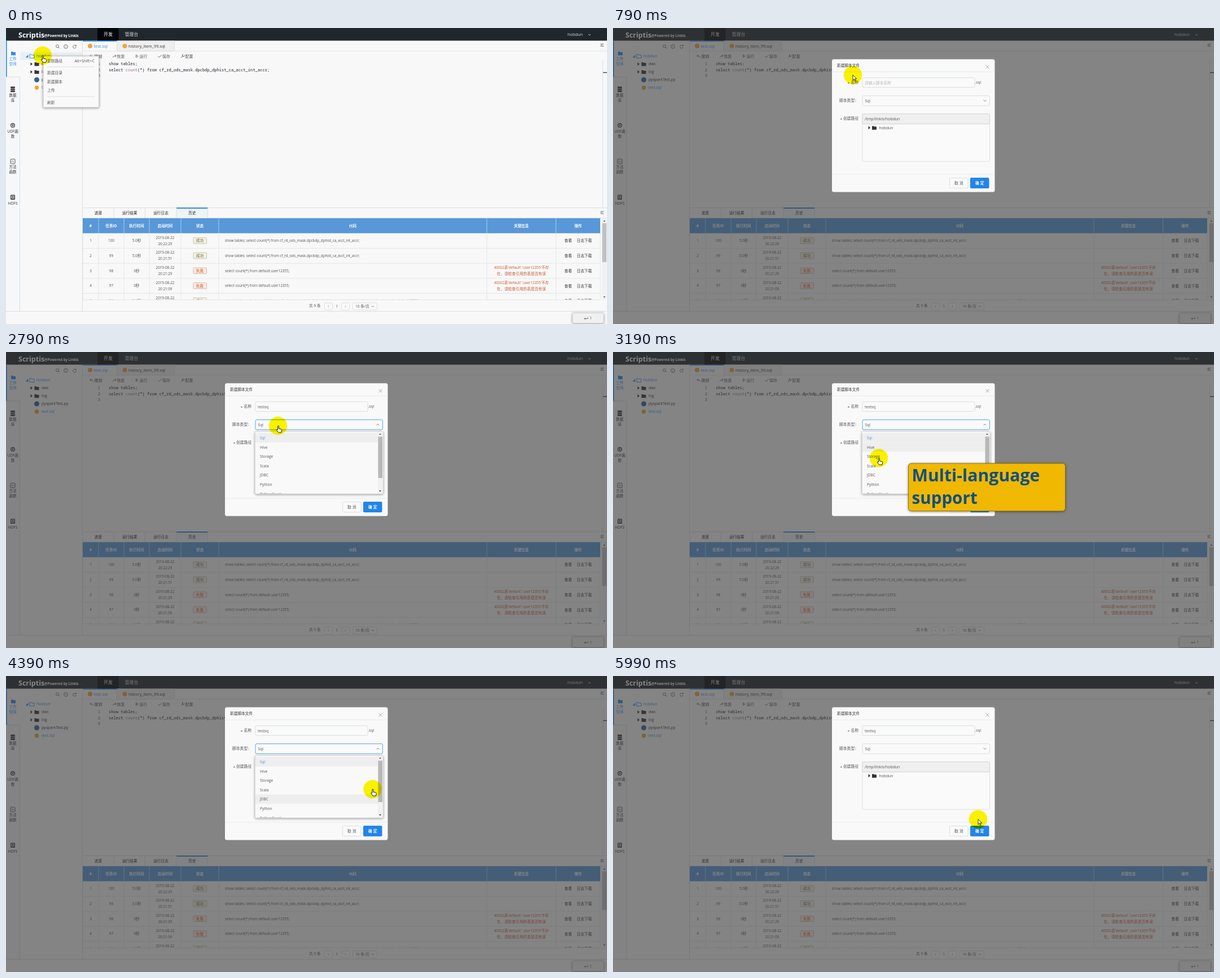
Write an HTML page that moves like this. It is 1065 px wide and 526 px high and loops after 6050 ms.

```html
<!DOCTYPE html>
<html lang="zh-CN">
<head>
<meta charset="utf-8">
<title>Script editor</title>
<style>
html, body { margin: 0; width: 100%; height: 100%; overflow: hidden; background: #f8f8f8; }
svg { display: block; width: 1065px; height: 526px; }
text { font-family: "Open Sans", "Noto Sans CJK SC", "Noto Sans CJK", sans-serif; white-space: pre; }
.mono { font-family: "Noto Sans Mono", "DejaVu Sans Mono", monospace; }
.bold { font-weight: 700; }
.line { fill: none; stroke: #666; stroke-width: .9; }
.shadow { filter: drop-shadow(0 1px 2px #0006); }
#halo { fill: #fff700; mix-blend-mode: multiply; }
</style>
</head>
<body>
<svg id="stage" viewBox="0 0 1065 526"></svg>
<script>
const USER = 'hobdun', BLUE = '#2d8cf0', GREY = '#555', DARK = '#333', EDGE = '#dcdee2';
const stage = document.getElementById('stage');

// y is the vertical middle of the text
const text = (x, y, s, size = 6.7, fill = GREY, anchor = 'start', cls = '') =>
  `<text x="${x}" y="${y + size * .36}" font-size="${size}" fill="${fill}" text-anchor="${anchor}" class="${cls}">${s}</text>`;
const mid = (x, y, s, size, fill, cls) => text(x, y, s, size, fill, 'middle', cls);
const box = (x, y, w, h, fill, stroke = 'none', r = 0, more = '') =>
  `<rect x="${x}" y="${y}" width="${w}" height="${h}" fill="${fill}" stroke="${stroke}" rx="${r}" ${more}/>`;
const hline = (x, y, w, c = EDGE) => box(x, y, w, 1, c);
const vline = (x, y, h, c = EDGE) => box(x, y, 1, h, c);
const shape = (x, y, d, fill) => `<path transform="translate(${x} ${y})" d="${d}" fill="${fill}"/>`;
const stroke = (x, y, d, c = '#666') =>
  `<path transform="translate(${x} ${y})" d="${d}" class="line" style="stroke:${c}"/>`;
const dot = (x, y, r, fill) => `<circle cx="${x}" cy="${y}" r="${r}" fill="${fill}"/>`;
const group = (id, body, more = '') => `<g id="${id}" ${more}>${body}</g>`;

const FOLDER = 'M-4-3h3l1 1h4v5.5h-8z', RIGHT = 'M-1.5-3l3.5 3-3.5 3z', CORNER = 'M2.5-2.5v5h-5z';
const DOWN = 'M-2.5-1.2L0 1.2 2.5-1.2', UP = 'M-2.5 1.2L0-1.2 2.5 1.2';
const TRI_UP = 'M-2 1L0-1.2 2 1z', TRI_DOWN = 'M-2-1L0 1.2 2-1z';
const MENU = 'M-3-2h6M-3 0h4M-3 2h6';

function header() {
  return box(0, 0, 1065, 22.5, '#20272d') + box(162, 0, 37.5, 22.5, '#04070a') +
    text(22, 12.3, 'Scriptis', 12.5, '#fff', 'start', 'bold') +
    text(68, 14.2, '@Powered by Linkis', 6.15, '#fff', 'start', 'bold') +
    mid(181, 11.3, '开发', 8, '#fff') + mid(222.5, 11.3, '管理台', 7.8, '#ddd') +
    text(995, 11.3, USER, 7.4, '#ddd') + stroke(1034, 12, 'M-2-1L0 1 2-1', '#ddd');
}

function sidebar() {
  const labels = [[55, '工作', BLUE], [64, '空间', BLUE], [119.5, '数据'], [128.5, '库'], [183.5, 'UDF函'],
    [192.5, '数'], [247, '方法'], [256, '函数'], [311.5, 'HDFS']];
  return box(0, 87, 24, 416, '#f6f7f8') + box(0, 22.5, 1.6, 64.5, BLUE) + hline(0, 86.5, 24) + vline(24, 87, 416) +
    labels.map(([y, s, c]) => mid(12, y, s, 6.6, c || DARK)).join('') +
    shape(13, 45, FOLDER, BLUE) +
    [105.5, 109, 112.5].map(y => box(8, y - 1.5, 8, 3, '#444', 'none', 1.3)).join('') +
    dot(12, 173, 4, '#444') + dot(12, 173, 2.6, '#f6f7f8') + dot(12, 173, 1.4, '#444') +
    box(8, 233, 8, 8, 'none', '#555', 1) + mid(12, 237, 'fx', 5) +
    box(8, 296.5, 8, 8.5, '#444', 'none', 1) + box(9.5, 298, 5, 5, '#ddd') + dot(12, 300.5, 1.4, '#444');
}

function tree() {
  return vline(135, 22.5, 481) +
    `<circle cx="91" cy="32.3" r="2.5" class="line"/>` + stroke(91, 32.3, 'M1.8 1.8L4 4') +
    `<circle cx="106" cy="33" r="3.4" class="line"/>` + mid(106, 33, 'i', 5) +
    stroke(121.5, 33, 'M2.3-1.5A2.8 2.8 0 1 0 2.8.8M2.8-3v2H.8') +
    group('rowHover', box(25, 43, 110, 14, '#eaf0f1')) +
    shape(37, 50, CORNER, BLUE) + stroke(46, 50, FOLDER, BLUE) + text(54, 50, USER, 6.7, BLUE) +
    [[64, 'dwc'], [78, 'log']].map(([y, s]) =>
      shape(45, y, RIGHT, DARK) + shape(54.5, y, FOLDER, DARK) + text(63, y, s, 6.9, DARK)).join('') +
    dot(54.5, 92, 4.5, '#35618c') + text(63, 92, 'pysparkTest.py', 6.85, DARK) +
    dot(54.5, 106, 3.7, '#eca63c') + text(63, 106, 'test.sql', 6.85, BLUE);
}

function editor() {
  const tools = [[152, '撤销', 'M3 2.5Q2-1-3-.5M-1-2.8L-3.2-.5-1 1.6'], [192, '恢复', 'M-3 2.5Q-2-1 3-.5M1-2.8L3.2-.5 1 1.6'],
    [232, '运行', 'M-1.5-2.5L2 0-1.5 2.5z'], [272.5, '保存', 'M-3 0L-1 2.3 3.3-2.3'], [313, '配置', 'M-3 3L1-1M3.3-1.6A2 2 0 1 1 1.2-3.2']];
  const code = (y, n, s) => text(167, y, n, 7.1, '#3d5a6b', 'end', 'mono') + text(182, y, s, 7.1, '#1d1d2b', 'start', 'mono');
  return box(196.5, 23, 102, 18, '#efefef', EDGE) + hline(136, 40.5, 929, '#e4e5e7') + box(136, 22.5, 60, 1.5, BLUE) +
    dot(149, 32, 4, '#eca63c') + text(155.5, 32, 'test.sql', 7.35, BLUE) +
    dot(210.5, 32, 4, '#eca63c') + text(217, 32, 'history_item_99.sql', 7.25, DARK) +
    stroke(1056.5, 30.5, MENU) +
    tools.map(([x, s, d]) => stroke(x, 50, d) + text(x + 4.5, 50, s, 7)).join('') +
    code(63.8, 1, 'show tables;') +
    code(74.3, 2, 'select <tspan fill="#a070a0">count</tspan>(*) from cf_rd_ods_mask.dpcbdp_dphist_ca_acct_int_accr;') +
    code(84.8, 3, '') +
    vline(1057, 57, 262) + box(1058, 78.5, 7, 1.4, '#444');
}

function results() {
  const edges = [136, 164, 209, 254, 310, 377, 852, 974.5, 1053];
  const mids = edges.slice(1).map((x, i) => (x + edges[i]) / 2);
  const heads = ['#', '任务ID', '执行时间', '启动时间', '状态', '代码', '关键信息', '操作'];
  const good = 'show tables; select count(*) from cf_rd_ods_mask.dpcbdp_dphist_ca_acct_int_accr;';
  const bad = 'select count(*) from default.user12355;';
  const long = good.slice(0, -1) + ' where acct_int_mask_ods limit 5000;';
  const rows = [['5.0秒', '20:22:29', good], ['5.0秒', '20:21:51', good], ['0秒', '20:21:29', bad], ['0秒', '20:21:09', bad], ['5.0秒', '20:20:46', long]];
  const row = ([cost, time, code], i) => {
    const y = 378 + i * 26.7, fail = code === bad;
    const tag = fail ? ['#f9ece3', '#dcb8a6', '#d0502a', '失败'] : ['#f3f2e2', '#c8c6a6', '#66664a', '成功'];
    return hline(136, y + 13, 917, '#e3e6ea') + mid(mids[0], y, i + 1, 6.3) + mid(mids[1], y, 100 - i, 6.5) +
      mid(mids[2], y, cost, 6.5) + mid(mids[3], y - 5.5, '2019-08-22', 6.3) + mid(mids[3], y + 5.3, time, 6.3) +
      box(332, y - 5.3, 23.5, 10.5, tag[0], tag[1], 1) + mid(mids[4], y, tag[3], 6.7, tag[2]) +
      text(388, y, code, 6.25) +
      (fail ? mid(mids[6], y - 5.5, "40002表'default'.'user12355'不存", 6.4, '#c8562c') +
        mid(mids[6], y + 5.3, '在，请检查引用的表是否有误', 6.7, '#c8562c') : '') +
      text(989.5, y, '查看', 6.7, DARK) + text(1011.5, y, '日志下载', 6.7, DARK);
  };
  const tabs = ['进度', '运行结果', '运行日志', '历史'];
  return hline(136, 319, 929) + hline(136, 337.5, 929) + box(302, 319, 55.5, 19, '#f1f4f7') + box(302, 319, 55.5, 2, BLUE) +
    tabs.map((s, i) => mid(163.5 + i * 55.5, 328.5, s, 6.7, '#222') + vline(190.5 + i * 55.5, 320, 18)).join('') +
    stroke(1056.5, 328, MENU) +
    `<clipPath id="body"><rect x="136" y="338" width="918" height="145"/></clipPath>` +
    group('table', rows.map(row).join('') + edges.map(x => vline(x - .5, 365, 118, '#e3e6ea')).join(''), 'clip-path="url(#body)"') +
    box(136, 338, 917, 26.7, '#5898d8') + edges.slice(1, -1).map(x => vline(x - .5, 338, 26.7, '#a9c9e9')).join('') +
    heads.map((s, i) => mid(mids[i], 351.5, s, 6.6, '#fff', 'bold')).join('') +
    hline(136, 482.5, 917, '#e3e6ea') +
    box(1056, 338, 8.5, 145, '#f1f1f1') + box(1056.5, 347, 7.5, 69, '#c1c1c1') +
    shape(1060.3, 343, TRI_UP, GREY) + shape(1060.3, 478, TRI_DOWN, GREY) +
    text(537, 494, '共 9 条', 6.7) + box(564.5, 488.5, 14, 12.5, '#fafafa', EDGE, 2) + box(594.5, 488.5, 14, 12.5, '#fafafa', EDGE, 2) +
    stroke(571.5, 494.7, 'M1-2L-1 0 1 2', '#aaa') + stroke(601.5, 494.7, 'M-1-2L1 0-1 2', '#aaa') + mid(586.5, 494.7, '1', 6.7) +
    box(614.5, 488.5, 43, 12.5, '#fafafa', EDGE, 2) + text(619, 494.7, '10 条/页', 6.6) + stroke(650, 494.7, 'M-2-1L0 1 2-1') +
    hline(0, 503, 1065) + box(1004, 506.5, 55, 18, '#f0f0f0', '#d4d4d4', 2, 'class="shadow"') +
    stroke(1028, 516, 'M3-2v2.5h-6M-1.2-1.3L-3 .5-1.2 2.3') + text(1034.5, 516, '1', 6.7);
}

function contextMenu() {
  const item = (y, s, id = '') => group(id || 'item' + y, text(73, y, s, 6.75, GREY));
  return box(66, 50, 98.5, 91, '#f9f9f9', '#ccc', 1.5, 'class="shadow"') +
    group('uploadHover', box(66.5, 103.5, 97.5, 15, '#eaf0f0')) +
    item(59, '复制路径') + text(121.5, 59, 'Alt+Shift+C', 6.9) + hline(73, 68.5, 84) +
    item(80, '新建目录') + item(95.5, '新建脚本') + item(111, '上传', 'upload') +
    hline(73, 121.5, 84) + item(132.5, '刷新');
}

function dialog() {
  return box(0, 0, 1065, 526, '#373737', 'none', 0, 'opacity=".6"') +
    box(388, 55.5, 288.5, 236, '#f9f9f9', 'none', 3.5) +
    text(397, 67, '新建脚本文件', 6.7, DARK) + stroke(663.5, 69, 'M-3-3L3 3M3-3L-3 3', '#999') + hline(388, 77.5, 288.5, '#e8eaec') +
    text(415.5, 98, '*', 7, '#8a5a40') + text(421.5, 96.8, '名称', 6.8) +
    box(442, 88.5, 199, 17, '#fafafa', EDGE, 2, 'id="field"') +
    text(446, 97.3, '请输入脚本名称', 6.7, '#b8b8b8').replace('<text', '<text id="hint"') +
    text(446, 97.3, '', 6.8, GREY).replace('<text', '<text id="typed"') +
    text(641.5, 96.8, '.sql', 6.6) +
    text(401, 128.7, '脚本类型：', 6.8) + box(442, 120.5, 225.5, 17.5, '#fafafa', EDGE, 2, 'id="select"') + text(446.5, 129.3, 'Sql', 6.7) +
    group('closedMark', stroke(659, 129.2, DOWN, '#777')) + group('openMark', stroke(659, 129.2, UP, '#777')) +
    text(402.5, 162, '*', 7, '#8a5a40') + text(408, 161, '创建路径', 6.8) +
    box(442, 152.5, 225.5, 84.5, '#fafafa', EDGE, 2) + box(442, 152.5, 225.5, 18, '#efefef', '#d4d4d4', 1) +
    text(446, 161.8, '/tmp/linkis/' + USER, 6.9) +
    shape(454, 177.3, RIGHT, DARK) + shape(463, 177.3, FOLDER, DARK) + text(471.5, 177.3, USER, 6.8) +
    hline(388, 259.5, 288.5, '#e8eaec') +
    box(596.5, 266.5, 32.5, 18, '#fafafa', EDGE, 2) + mid(612.8, 275.7, '取 消', 6.8, GREY) +
    box(633, 266, 33.5, 19, '#2385e8', 'none', 2) + mid(649.8, 275.7, '确 定', 6.8, '#fff', 'bold');
}

function dropdown() {
  const langs = ['Sql', 'Hive', 'Storage', 'Scala', 'JDBC', 'Python', 'PythonSpark'];
  return box(441.5, 141.5, 226.5, 110.5, '#f9f9f9', '#ddd', 2, 'class="shadow"') +
    `<clipPath id="list"><rect x="441" y="142" width="218" height="109.5"/></clipPath>` +
    group('langs', box(442, 144, 217, 16.6, '#eee') + box(442, 144, 217, 16.6, '#eee', 'none', 0, 'id="langHover"') +
      langs.map((s, i) => text(450, 152.6 + i * 16.6, s, 6.5, i ? GREY : '#4a90d9')).join(''), 'clip-path="url(#list)"') +
    box(659, 142, 8.5, 109.5, '#f1f1f1') + box(659.5, 150.5, 7.5, 73.5, '#b8b8b8') +
    shape(663, 146, TRI_UP, GREY) + shape(663, 247, TRI_DOWN, DARK);
}

function callout() {
  return box(523.5, 198, 278, 84.5, '#f0b800', '#8a6d10', 5, 'class="shadow"') +
    text(529.5, 219.4, 'Multi-language', 30.2, '#0f5083', 'start', 'bold') +
    text(529.5, 259, 'support', 29.6, '#0f5083', 'start', 'bold');
}

const cursors = {
  hand: '<path d="M-.6 1.3c0-1.7 2.1-1.7 2.1 0v3.9l4 .9c1 .3 1.4 1 1.2 2l-.9 4H.8L-2.5 7.8c-.6-1 .7-1.8 1.9-.5z" fill="#fff" stroke="#000" stroke-width=".9"/>',
  arrow: '<path d="M0 0v9.4l2.2-2 1.5 3.4 1.5-.7-1.5-3.3h3z" fill="#fff" stroke="#000" stroke-width=".8"/>',
  beam: '<path d="M-2-4.5h1.4L0-4l.6-.5H2M0-4v8M-2 4.5h1.4L0 4l.6.5H2" fill="none" stroke="#222"/>'
};

stage.innerHTML = box(0, 0, 1065, 526, '#f8f8f8') + header() + sidebar() + tree() + editor() + results() +
  group('menu', contextMenu()) + group('dialog', dialog()) + group('dropdown', dropdown()) + group('callout', callout()) +
  '<circle id="halo" r="16.2"/>' +
  group('pointer', Object.entries(cursors).map(([k, d]) => group(k, d)).join(''));

const poses = [
  [65, 49, 'hand'], [106, 91.5, 'hand'], [425, 83.5, 'arrow'], [454, 96.5, 'beam'],
  [454, 96.5, 'beam'], [454, 96.5, 'beam'], [480, 124, 'hand'], [482, 131, 'hand'],
  [471, 188.5, 'hand'], [472, 189, 'hand'], [560, 197, 'hand'], [649.5, 201, 'hand'],
  [655, 203, 'hand'], [652, 222, 'arrow'], [648, 246, 'arrow'], [647, 254.5, 'arrow']
];
const hovered = { 8: 1, 9: 2, 10: 3, 11: 4, 12: 3 };
const el = id => document.getElementById(id);
const show = (id, on) => el(id).setAttribute('visibility', on ? 'inherit' : 'hidden');

function draw(ms) {
  const step = Math.floor((ms % 6050 + 10) / 400);
  const [x, y, kind] = poses[step];
  const open = step >= 7 && step <= 12, focus = step >= 3 && step <= 6;
  const name = step < 4 ? '' : step < 5 ? 'te' : 'testsq';
  show('menu', step < 2);
  show('rowHover', step < 2);
  show('uploadHover', step === 1);
  el('upload').setAttribute('opacity', step === 1 ? .5 : 1);
  show('dialog', step >= 2);
  show('hint', step >= 2 && !name);
  el('typed').textContent = name + (focus && step < 6 ? '|' : '');
  el('field').setAttribute('stroke', focus ? '#57a3f3' : EDGE);
  el('select').setAttribute('stroke', open ? '#57a3f3' : EDGE);
  show('closedMark', step >= 2 && !open);
  show('openMark', open);
  show('dropdown', open);
  el('langHover').setAttribute('y', 144 + 16.6 * (hovered[step] || 0));
  show('callout', step >= 8 && step <= 10);
  for (const k in cursors) show(k, k === kind);
  for (const id of ['halo', 'pointer']) el(id).setAttribute('transform', `translate(${x} ${y})`);
}

const start = performance.now();
function tick() {
  draw(performance.now() - start);
  requestAnimationFrame(tick);
}
draw(0);
requestAnimationFrame(tick);
</script>
</body>
</html>
```
